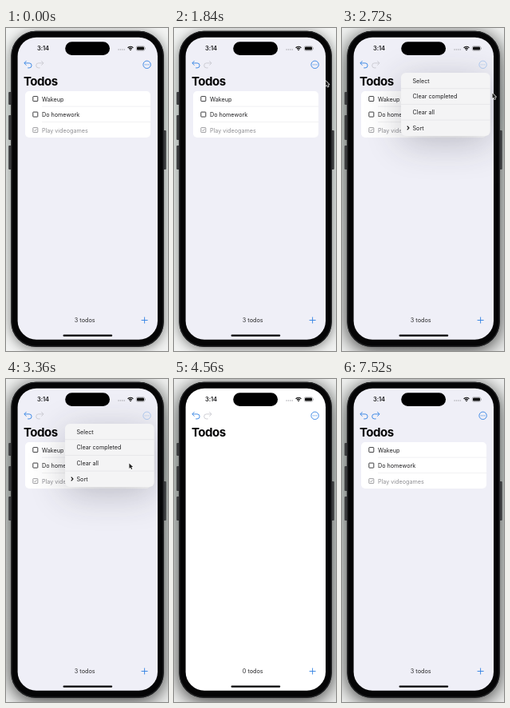
An HTML page with a canvas for the animation above (7600 ms loop, 203 px wide and 404 px high).

```html
<!DOCTYPE html>
<html lang="en">
<head>
<meta charset="utf-8">
<title>Todos</title>
<style>
html, body { margin: 0; width: 100%; height: 100%; overflow: hidden; background: #e6e8e7; }
canvas { display: block; width: 203px; height: 404px; }
</style>
</head>
<body>
<canvas id="stage"></canvas>
<script>
const W = 203, H = 404, LOOP = 7600, STEP = 80;
const BLUE = '#2f80e4', GREY = '#c9c9d0', PAPER = '#efeff7';
const FONT = 'Inter, "Liberation Sans", sans-serif';
const canvas = document.getElementById('stage');
const ctx = canvas.getContext('2d');
const ratio = window.devicePixelRatio || 1;
canvas.width = W * ratio;
canvas.height = H * ratio;

const clamp = v => Math.max(0, Math.min(1, v));
const ease = v => v * v * (3 - 2 * v);
const span = (t, a, b) => clamp((t - a) / (b - a));

// [time, x, y] for the pointer tip
const trips = [
  [[1680, 204, 80], [1840, 190, 66], [2240, 178, 46], [2480, 178, 47], [2720, 188.5, 81.5],
   [3120, 158, 103], [3520, 152, 107], [3840, 152, 110], [4000, 160, 112], [4320, 206, 120]],
  [[4960, 205, 70], [5200, 120, 55], [5440, 36, 48], [5600, 28, 46], [5920, 28, 46],
   [6240, 98, 48], [6560, 170, 62], [6800, 206, 72]]
];

function round(x, y, w, h, r, color) {
  ctx.fillStyle = color;
  ctx.beginPath();
  ctx.roundRect(x, y, w, h, r);
  ctx.fill();
}

function line(points, color, width) {
  ctx.strokeStyle = color;
  ctx.lineWidth = width;
  ctx.beginPath();
  points.forEach(([x, y]) => ctx.lineTo(x, y));
  ctx.stroke();
}

function text(str, x, y, size, color = '#1c1c1e', weight = 400, spacing = 0, align = 'left') {
  ctx.font = `${weight} ${size}px ${FONT}`;
  ctx.letterSpacing = spacing + 'px';
  ctx.textAlign = align;
  ctx.fillStyle = color;
  ctx.fillText(str, x, y);
}

function shadow(color, blur, dy) {
  ctx.shadowColor = color;
  ctx.shadowBlur = blur * ratio;
  ctx.shadowOffsetY = dy * ratio;
}

function drawPhone(focused, screen) {
  const back = ctx.createLinearGradient(0, 0, 0, H);
  back.addColorStop(0, '#f3f4f3');
  back.addColorStop(.25, '#e4ebe7');
  back.addColorStop(1, '#f2f3f2');
  ctx.fillStyle = back;
  ctx.fillRect(0, 0, W, H);

  ctx.save();
  shadow(focused ? 'rgba(0,0,0,.8)' : 'rgba(0,0,0,.5)', focused ? 24 : 15, focused ? 4 : 2);
  round(6.4, 3.8, 191.3, 395, 31, '#111');
  ctx.restore();
  [[80, 16], [109, 31], [147, 30]].forEach(([y, h]) => round(3.2, y, 5, h, 1, '#3a3b3d'));
  round(196, 128, 4.7, 49, 1, '#3a3b3d');
  round(6.4, 3.8, 191.3, 395, 31, '#202123');
  round(7.6, 5, 188.9, 392.6, 30, '#050506');
  round(14.6, 11.7, 175.4, 378, 23.5, screen);
}

function drawStatus() {
  round(74.2, 17.3, 55.8, 16.7, 8.3, '#000');
  text('3:14', 39, 28.2, 7.5, '#1c1c1e', 600, -.1);
  for (let i = 0; i < 4; i++) round(140.3 + i * 2.4, 26.3, 1.5, 1.5, .7, '#aaaab0');
  ctx.strokeStyle = '#111';
  ctx.lineWidth = 1.2;
  [2.6, 4.7].forEach(r => {
    ctx.beginPath();
    ctx.arc(156, 28, r, -Math.PI * .76, -Math.PI * .24);
    ctx.stroke();
  });
  round(155.2, 26.6, 1.6, 1.6, .8, '#111');
  ctx.strokeStyle = '#99999d';
  ctx.lineWidth = .6;
  ctx.beginPath();
  ctx.roundRect(163.2, 22.7, 10.6, 5.6, 1.8);
  ctx.stroke();
  round(164, 23.4, 9, 4.2, 1.1, '#111');
  round(174.3, 24.5, .7, 2, .4, '#99999d');
}

function drawArrow(x, flip, color) {
  ctx.save();
  ctx.translate(x, 45.6);
  ctx.scale(flip, 1);
  line([[-2, -4.5], [-4.7, -1.7], [-2, 1.1]], color, .9);
  ctx.beginPath();
  ctx.moveTo(-4.5, -1.7);
  ctx.lineTo(1.6, -1.7);
  ctx.arc(1.6, 1.3, 3, -Math.PI / 2, Math.PI / 2);
  ctx.lineTo(-.3, 4.3);
  ctx.stroke();
  ctx.restore();
}

function drawBars(state) {
  drawArrow(27.5, 1, state.undo ? BLUE : GREY);
  drawArrow(42.3, -1, state.redo ? BLUE : GREY);
  ctx.globalAlpha = state.menu ? .35 : 1;
  ctx.strokeStyle = BLUE;
  ctx.lineWidth = .9;
  ctx.beginPath();
  ctx.arc(176.6, 45.8, 4.7, 0, 7);
  ctx.stroke();
  for (let i = -1; i <= 1; i++) round(176 + i * 2.2, 45.2, 1.2, 1.2, .6, BLUE);
  ctx.globalAlpha = 1;
  text('Todos', 22, 71.5, 15, '#050506', 700, -.5);
  text(`${state.count} todos`, 98.7, 368, 7.25, '#2a2a2c', 400, 0, 'center');
  line([[169.6, 365.5], [177.6, 365.5]], BLUE, .9);
  line([[173.6, 361.5], [173.6, 369.5]], BLUE, .9);
  round(71.5, 383.6, 61.7, 2.1, 1, '#050506');
}

function drawList(alpha) {
  if (!alpha) return;
  ctx.globalAlpha = alpha;
  round(24, 79, 157, 58, 5, '#fff');
  ['Wakeup', 'Do homework', 'Play videogames'].forEach((label, i) => {
    const y = 88.6 + i * 19.5, done = i === 2;
    const color = done ? '#8d8d91' : '#1c1c1e';
    if (i) line([[45, y - 10], [181, y - 10]], '#e6e6ea', .6);
    ctx.strokeStyle = color;
    ctx.lineWidth = .85;
    ctx.beginPath();
    ctx.roundRect(33.8, y - 3, 6, 6, .6);
    ctx.stroke();
    if (done) line([[35.3, y], [36.4, y + 1.3], [38.4, y - 1.4]], color, .8);
    text(label, 45, y + 2.9, 7.2, color);
  });
  ctx.globalAlpha = 1;
}

function drawMenu(right, scale, height, alpha, lit) {
  if (!alpha) return;
  ctx.save();
  ctx.translate(right, 56);
  ctx.scale(scale, scale);
  ctx.globalAlpha = alpha;
  ctx.save();
  shadow('rgba(40,40,55,.27)', 46, 9);
  round(-111.7, 0, 111.7, height, 6, '#f4f4f5');
  ctx.restore();
  ctx.beginPath();
  ctx.roundRect(-111.7, 0, 111.7, height, 6);
  ctx.clip();
  if (lit) {
    ctx.fillStyle = '#e2e2e4';
    ctx.fillRect(-111.7, 39.4, 111.7, 19.7);
  }
  ['Select', 'Clear completed', 'Clear all', 'Sort'].forEach((label, i) => {
    const y = i * 19.7;
    if (i) line([[-111.7, y], [0, y]], '#dedee2', .6);
    text(label, -97.2, y + 12.5, 7.2);
  });
  line([[-104, 66.7], [-101.8, 69], [-104, 71.3]], '#111', 1.1);
  ctx.restore();
}

function drawPointer(t) {
  const trip = trips.find(p => t >= p[0][0] && t < p[p.length - 1][0]);
  if (!trip) return;
  const i = trip.findIndex(p => p[0] > t);
  const [ta, xa, ya] = trip[i - 1], [tb, xb, yb] = trip[i];
  const k = (t - ta) / (tb - ta);
  ctx.save();
  ctx.translate(xa + (xb - xa) * k, ya + (yb - ya) * k);
  ctx.scale(.9, .9);
  ctx.beginPath();
  [[0, 0], [0, 7.2], [1.7, 5.7], [2.9, 8.5], [4.2, 7.9], [3, 5.2], [5.2, 5.2]]
    .forEach(([x, y]) => ctx.lineTo(x, y));
  ctx.closePath();
  ctx.lineJoin = 'round';
  ctx.strokeStyle = '#fff';
  ctx.lineWidth = 1.3;
  ctx.stroke();
  ctx.fillStyle = '#222';
  ctx.fill();
  ctx.restore();
}

function mix(k) {
  const part = v => Math.round(255 + (v - 255) * k);
  return `rgb(${part(239)},${part(239)},${part(247)})`;
}

function draw(t) {
  const gone = t >= 3920 && t < 5760;
  const list = t < 5000 ? 1 - ease(span(t, 3840, 4000)) : ease(span(t, 5680, 5840));
  const opening = ease(span(t, 2400, 2640));
  const closing = span(t, 3760, 4000);
  ctx.setTransform(ratio, 0, 0, ratio, 0, 0);
  drawPhone(t >= 2400, list === 1 ? PAPER : mix(list));
  drawStatus();
  drawList(list);
  drawBars({
    undo: t < 5760 || t >= 6560,
    redo: t >= 5760,
    menu: t >= 2400 && t < 4000,
    count: gone ? 0 : 3
  });
  if (t >= 2400 && t < 4000) {
    const shut = closing * .375;
    drawMenu(185.7 - closing * 4, (.2 + .8 * opening) * (1 - shut), 79 - closing * 22,
      opening * (1 - span(t, 3840, 4000)), t >= 3600);
  }
  drawPointer(t);
}

const start = performance.now();
function tick() {
  const t = (performance.now() - start) % LOOP;
  draw(Math.floor(t / STEP) * STEP);
  requestAnimationFrame(tick);
}
tick();
</script>
</body>
</html>
```
